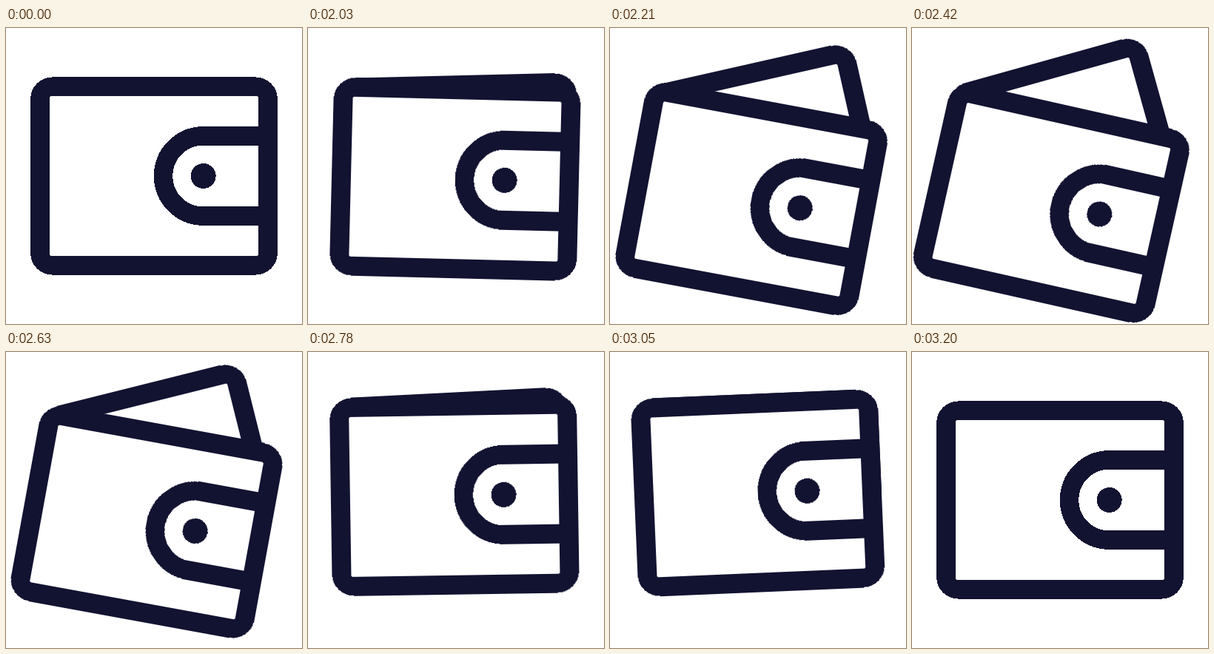
An HTML page that plays this animation: 400 by 400 pixels, repeating every 3230 ms.

```html
<!DOCTYPE html>
<html lang="en">
<head>
<meta charset="utf-8">
<title>Wallet</title>
<style>
  html, body {
    margin: 0;
    width: 100%;
    height: 100%;
    overflow: hidden;
    background: #fff;
  }
  svg {
    display: block;
    width: 100vw;
    height: 100vh;
    fill: none;
    stroke: #121331;
    stroke-width: 25.4;
    shape-rendering: crispEdges;
  }
  .front { fill: #fff; }
  .dot { fill: #121331; stroke: none; }

  .body, .flap {
    transform-origin: 200px 200px;
    animation: body 3230ms linear infinite;
  }
  /* the dash offset trims the hidden end of the flap */
  .flap {
    stroke-linecap: round;
    stroke-dasharray: 900;
    animation-name: flap;
  }

  @keyframes body {
    0%, 62.84% {
      transform: translate(0, 0) rotate(0deg);
      animation-timing-function: step-end;
    }
    62.845% {
      transform: translate(-1px, 4px) rotate(1.33deg);
      animation-timing-function: cubic-bezier(.33, .4, .67, .85);
    }
    68.42% {
      transform: translate(-8.8px, 31px) rotate(10.5deg);
      animation-timing-function: cubic-bezier(.15, .5, .3, 1);
    }
    79.1% {
      transform: translate(-11.9px, 37.4px) rotate(12.8deg);
      animation-timing-function: cubic-bezier(.33, 0, .67, .34);
    }
    81.424% {
      transform: translate(-10px, 30.2px) rotate(10.4deg);
      animation-timing-function: cubic-bezier(.33, .28, .67, .72);
    }
    86.068% {
      transform: translate(-2.2px, -6px) rotate(-.8deg);
      animation-timing-function: cubic-bezier(.33, .84, .67, 1);
    }
    90.712% {
      transform: translate(-.3px, -18px) rotate(-4.6deg);
      animation-timing-function: cubic-bezier(.33, 0, .67, .67);
    }
    95.356% {
      transform: translate(-.1px, -7px) rotate(-1.8deg);
      animation-timing-function: cubic-bezier(.33, .41, .67, 1);
    }
    99.07%, 100% { transform: translate(0, 0) rotate(0deg); }
  }

  @keyframes flap {
    0%, 62.84% {
      transform: translate(0, 0) rotate(0deg);
      stroke-dashoffset: 0;
      animation-timing-function: step-end;
    }
    62.845% {
      transform: translate(-1px, -1.6px) rotate(-1.3deg);
      stroke-dashoffset: 0;
      animation-timing-function: cubic-bezier(.33, .4, .67, .85);
    }
    68.42% {
      transform: translate(-6.6px, -15.2px) rotate(-12.7deg);
      stroke-dashoffset: -45;
      animation-timing-function: cubic-bezier(.15, .5, .3, 1);
    }
    79.1% {
      transform: translate(-14px, -18.9px) rotate(-15.8deg);
      stroke-dashoffset: -52;
      animation-timing-function: cubic-bezier(.33, 0, .67, .34);
    }
    81.424% {
      transform: translate(-11.8px, -18.8px) rotate(-14.1deg);
      stroke-dashoffset: -48;
      animation-timing-function: cubic-bezier(.33, .28, .67, .8);
    }
    86.068% {
      transform: translate(-10px, -10.8px) rotate(-2.9deg);
      stroke-dashoffset: -12;
      animation-timing-function: cubic-bezier(.33, .84, .67, 1);
    }
    90.712% {
      transform: translate(-.3px, -18px) rotate(-4.6deg);
      stroke-dashoffset: 0;
      animation-timing-function: cubic-bezier(.33, 0, .67, .67);
    }
    95.356% {
      transform: translate(-.1px, -7px) rotate(-1.8deg);
      stroke-dashoffset: 0;
      animation-timing-function: cubic-bezier(.33, .41, .67, 1);
    }
    99.07%, 100% {
      transform: translate(0, 0) rotate(0deg);
      stroke-dashoffset: 0;
    }
  }
</style>
</head>
<body>
<svg viewBox="0 0 400 400">
  <path class="flap" d="M62.5 79.17H337.5a16.67 16.67 0 0 1 16.67 16.67V205"/>
  <g class="body">
    <rect class="front" x="45.83" y="79.17" width="308.34" height="241.66" rx="16.67"/>
    <path d="M354.17 145.83H266.67a54.17 54.17 0 0 0 0 108.34H354.17"/>
    <circle class="dot" cx="266.67" cy="200" r="17"/>
  </g>
</svg>
</body>
</html>
```
